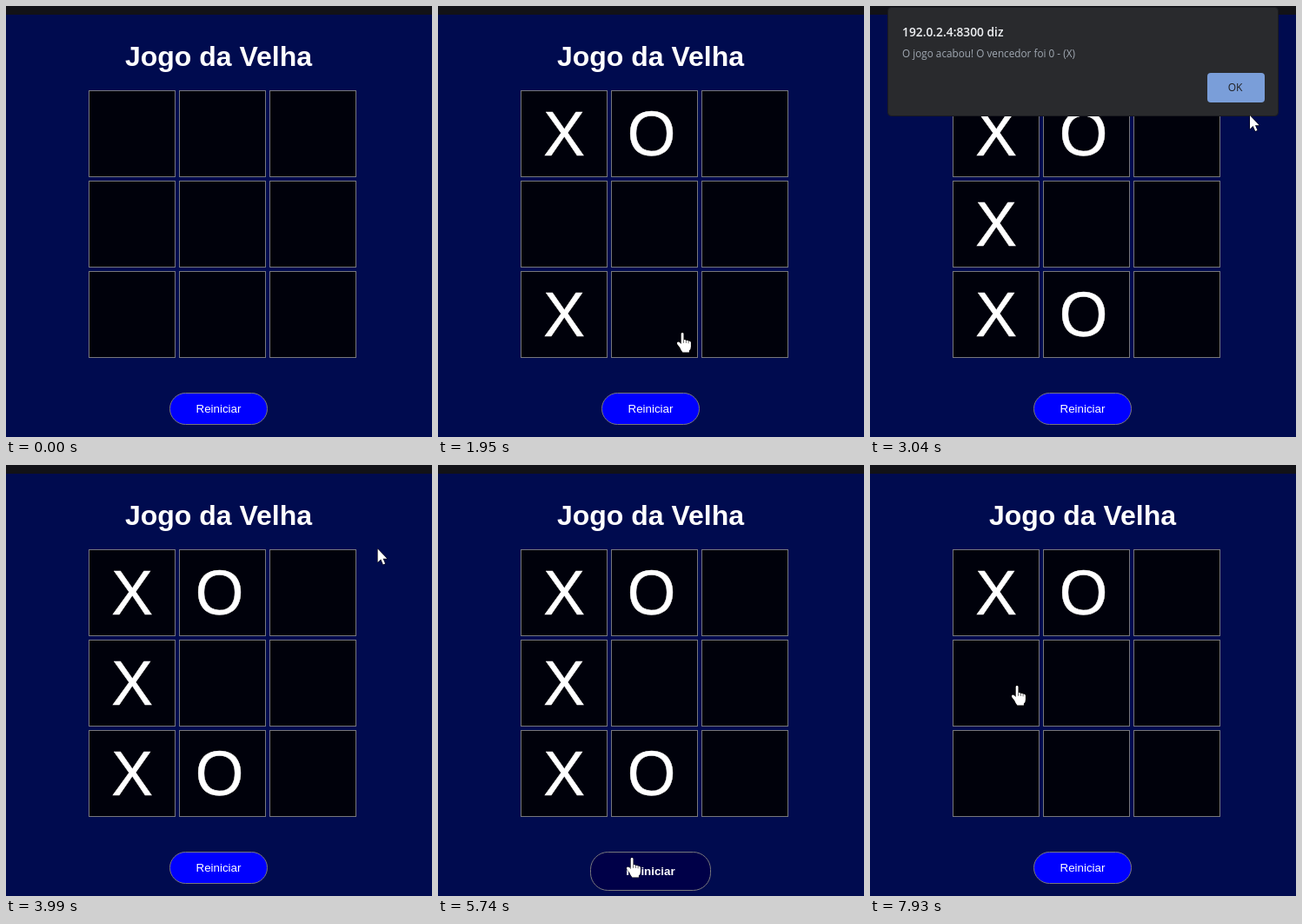
Write an HTML page that moves like this. It is 490 by 496 pixels and loops after 8000 ms.

```html
<!DOCTYPE html>
<html lang="pt">
<head>
<meta charset="utf-8">
<title>Jogo da Velha</title>
<style>
html, body { margin: 0; width: 100%; height: 100%; overflow: hidden; background: #000b4f; }
svg { display: block; width: 100%; height: 100%; }
text { font-family: "Liberation Sans", Arial, sans-serif; fill: #fff; }
.mid { text-anchor: middle; }
.ui { font-family: "Open Sans", "Noto Sans", sans-serif; }
.cell { fill: #00010b; stroke: #77777c; }
.mark { font-size: 71.5px; stroke: #fff; stroke-width: .5; }
.cursor { fill: #fff; stroke: #000; stroke-width: 1; paint-order: stroke; }
</style>
</head>
<body>
<svg viewBox="0 0 490 496">
  <rect width="490" height="496" fill="#000b4f"/>
  <rect width="490" height="10" fill="#121217"/>
  <text class="mid" x="244.5" y="69" font-size="32" font-weight="700">Jogo da Velha</text>
  <g id="board"></g>
  <rect id="button" stroke="#77777c"/>
  <text id="label" class="mid" x="244.5" font-size="13.333">Reiniciar</text>
  <g id="alert">
    <rect x="20.5" y="1.5" width="449" height="125" rx="4" fill="#292a2d" stroke="#1a1b20"/>
    <text class="ui" x="37" y="35" font-size="13.8" font-weight="600" style="fill:#eef0f3">192.0.2.4:8300 diz</text>
    <text class="ui" x="37" y="59" font-size="11.75" style="fill:#a0a8b2">O jogo acabou! O vencedor foi 0 - (X)</text>
    <rect id="ok" x="388" y="77" width="66" height="34" rx="4"/>
    <text class="ui mid" x="420" y="98" font-size="12" style="fill:#202124">OK</text>
  </g>
  <g id="cursor">
    <path id="arrow" class="cursor" d="M0 0V15.5l3.6-3.4 2.6 6 2.3-1-2.5-5.8h4.6z"/>
    <g id="hand">
      <path class="cursor" d="M-1.3 1.3a1.4 1.4 0 0 1 2.8 0V8.4q1.6-.8 2.9.5 1.6-.5 2.7.8 2-.5 2.8 1.4V16q0 3-2 4.5v2H.4q-2-2.5-3.2-5.5l-3.1-4q-.6-2 1-2.4 1.5 0 3.6 2.4z"/>
      <path d="M1.5 8.4v3.4M4.4 8.9v3M7.1 9.7v2.6" fill="none" stroke="#111" stroke-width=".6"/>
    </g>
  </g>
</svg>
<script>
const LOOP = 8000;
const GROW = 1000;  // button hover transition
const LEAD = 140;   // hover reacts this much before the drawn pointer arrives
const OPEN = 90;    // winning move to alert

const byId = id => document.getElementById(id);
const set = (el, attrs) => { for (const k in attrs) el.setAttribute(k, attrs[k]); };
const show = (el, on) => el.setAttribute("visibility", on ? "inherit" : "hidden");
const inside = (p, r) => p.x >= r.x && p.x < r.x + r.w && p.y >= r.y && p.y < r.y + r.h;

const add = (tag, attrs) => {
  const el = document.createElementNS("http://www.w3.org/2000/svg", tag);
  set(el, attrs);
  byId("board").append(el);
  return el;
};

const button = { x: 188, y: 445, w: 113, h: 37 };
const okButton = { x: 389, y: 78, w: 64, h: 32 };
const cells = Array.from({ length: 9 }, (_, i) => ({
  x: 95 + i % 3 * 104, y: 97 + Math.floor(i / 3) * 104, w: 100, h: 100
}));
for (const c of cells) add("rect", { class: "cell", x: c.x + .5, y: c.y + .5, width: 99, height: 99 });
const marks = cells.map(c => add("text", { class: "mark mid", y: c.y + 75 }));

const line = (from, step) => [from, from + step, from + 2 * step];
const lines = [0, 1, 2].flatMap(i => [line(3 * i, 1), line(i, 3)]).concat([line(0, 4), line(2, 2)]);

// The player: a pointer that moves, rests and clicks
const moves = [], clicks = [];
const enter = { t: 130, x: 354, y: 476 };
let now = enter;
const player = {
  go(ms, x, y) { moves.push({ from: now, to: now = { t: now.t + ms, x, y } }); return this; },
  rest(ms) { now = { ...now, t: now.t + ms }; return this; },
  click() { clicks.push(now); return this; }
};
player
  .go(750, 164, 150).click().rest(120)
  .go(240, 242, 150).click().rest(40)
  .go(290, 245, 455)
  .go(250, 162, 362).click().rest(60)
  .go(70, 281, 376).rest(70)
  .go(90, 255, 355).click()
  .go(340, 165, 256).click().rest(50)
  .go(250, 228, 311).rest(150)
  .go(140, 437, 126).rest(220)
  .go(440, 428, 93).rest(260).click()
  .go(400, 402, 298).rest(440)
  .go(140, 294, 479).rest(70)
  .go(590, 223, 452).rest(350).click().rest(50)
  .go(620, 178, 137).rest(70)
  .go(70, 163, 158).rest(240).click()
  .go(350, 262, 155).click()
  .go(580, 169, 254);

const smooth = u => u * u * (3 - 2 * u);

function pointerAt(t) {
  const { from, to } = moves.findLast(m => t >= m.from.t) || moves[0];
  const k = smooth(Math.min(1, Math.max(0, (t - from.t) / (to.t - from.t))));
  return { x: from.x + (to.x - from.x) * k, y: from.y + (to.y - from.y) * k };
}

// Time spans in which the pointer is over the button
const hovers = [];
for (let t = enter.t + LEAD, open = null; t < LOOP; t += 5) {
  const over = inside(pointerAt(t + LEAD), button);
  if (over && !open) hovers.push(open = { from: t });
  if (open) open.to = t;
  if (!over) open = null;
}

// Replays every click up to time t
function gameAt(t) {
  let board = Array(9).fill(""), turn = 0, wonAt = null;
  for (const c of clicks.filter(c => c.t <= t)) {
    const i = cells.findIndex(cell => inside(c, cell));
    if (wonAt !== null) wonAt = null;
    else if (inside(c, button)) { board.fill(""); turn = 0; }
    else {
      board[i] = "XO"[turn++ % 2];
      if (lines.some(l => l.every(n => board[n] === board[i]))) wonAt = c.t;
    }
  }
  return { board, alert: wonAt !== null && t >= wonAt + OPEN };
}

// CSS "ease" curve, solved by bisection
function ease(x) {
  if (x >= 1) return 1;
  const curve = (a, b, u) => 3 * a * u * (1 - u) ** 2 + 3 * b * u * u * (1 - u) + u ** 3;
  let lo = 0, hi = 1;
  for (let i = 0; i < 24; i++) {
    const u = (lo + hi) / 2;
    if (curve(.25, .25, u) < x) lo = u; else hi = u;
  }
  return curve(.1, 1, lo);
}

function drawButton(t) {
  const hover = hovers.find(h => t >= h.from && t < h.to);
  const p = hover ? ease((t - hover.from) / GROW) : 0;
  const grow = Math.round(13 * p);
  const h = button.h + Math.round(8 * p) - 1;
  set(byId("button"), {
    x: button.x - grow + .5, y: button.y + .5,
    width: button.w + 2 * grow - 1, height: h, rx: Math.min(20, h / 2),
    fill: `rgb(0,0,${Math.round(255 - 183 * p)})`
  });
  set(byId("label"), { y: 468 + Math.round(4 * p), "font-weight": p > .5 ? 700 : 400 });
}

function draw(t) {
  const { board, alert } = gameAt(t);
  marks.forEach((m, i) => {
    m.textContent = board[i];
    set(m, { x: cells[i].x + (board[i] === "O" ? 46.5 : 50) });
  });
  drawButton(t);

  const at = pointerAt(t);
  show(byId("alert"), alert);
  set(byId("ok"), { fill: inside(at, okButton) ? "#88aae4" : "#7a9ed9" });

  const clickable = [button, ...cells].some(r => inside(at, r));
  set(byId("cursor"), { transform: `translate(${at.x.toFixed(1)} ${at.y.toFixed(1)})` });
  show(byId("cursor"), t >= enter.t);
  show(byId("hand"), clickable);
  show(byId("arrow"), !clickable);
}

const start = performance.now();
function tick() {
  draw((performance.now() - start) % LOOP);
  requestAnimationFrame(tick);
}
tick();
</script>
</body>
</html>
```
